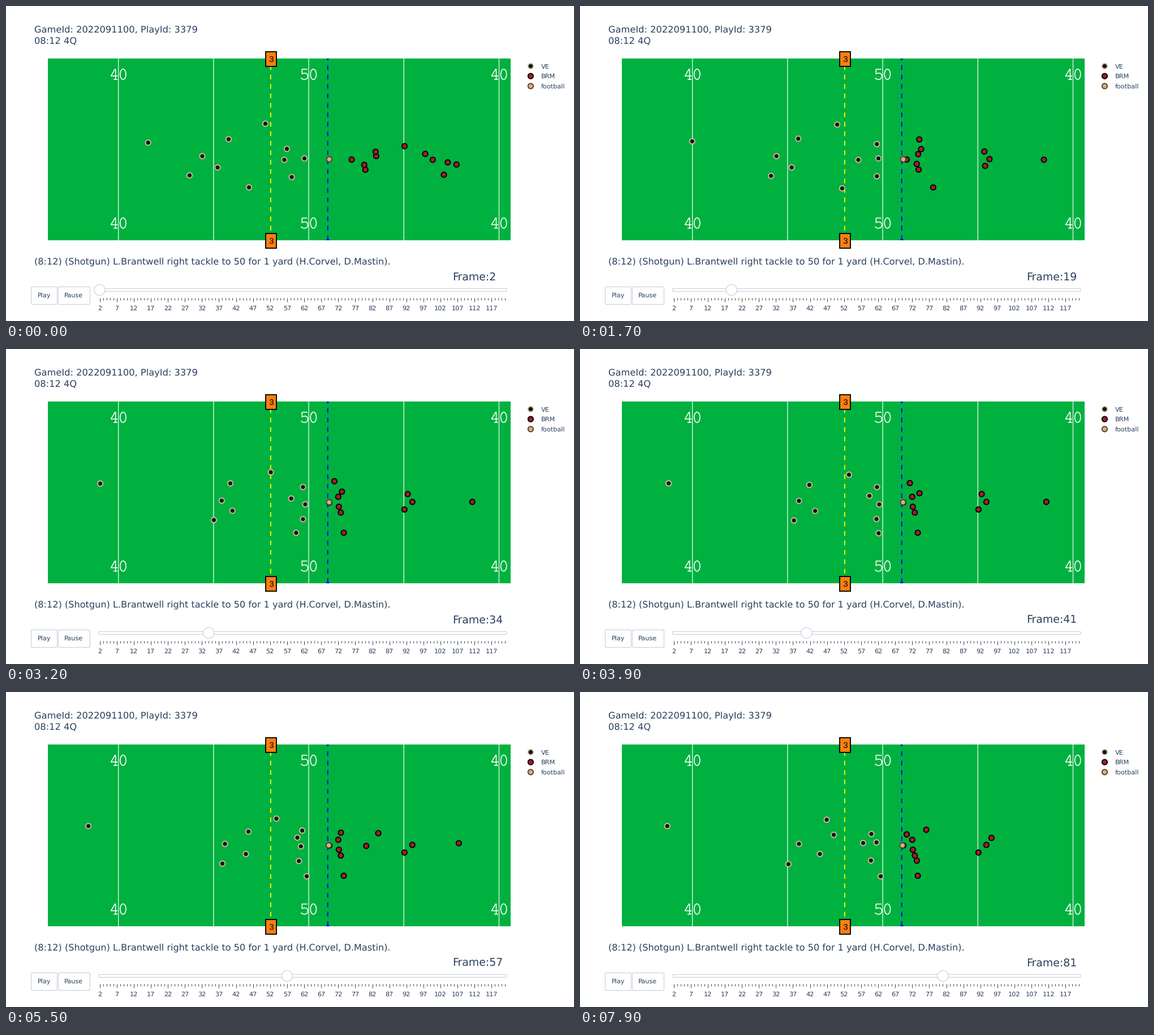
These frames come from a looping animation (1004x558 px, 8 s). A matplotlib script:

```python
import numpy as np
import matplotlib.pyplot as plt
from matplotlib.animation import FuncAnimation
from matplotlib.patches import Circle, FancyBboxPatch, PathPatch, Rectangle
from matplotlib.path import Path

W, H, DPI = 1004, 558, 64
PX = 72 / DPI                      # points per pixel
FRAMES, INTERVAL = 80, 100
UNIT = 0.93                        # stage pixels per layout pixel

INK = "#2a3f5f"
RIM = "#bec8d9"
GREEN = "#00b140"
ORANGE = "#ff7f0e"
BLUE = "#0000ff"
HOME = ("#101820", "#d3bc8d")
AWAY = ("#a71930", "#000000")
BALL = ("#cbb67c", "#663831")

plt.rcParams["font.family"] = "DejaVu Sans"
plt.rcParams["text.hinting"] = "none"

fig = plt.figure(figsize=(W / DPI, H / DPI), dpi=DPI, facecolor="white")
ax = fig.add_axes([0, 0, 1, 1])
ax.set_xlim(0, W)
ax.set_ylim(H, 0)
ax.axis("off")


def label(x, y, text, size, color=INK, ha="left", **kw):
    return ax.text(x, y, text, fontsize=size * PX, color=color, ha=ha,
                   va="baseline", zorder=6, **kw)


def line(xs, ys, color, width, **kw):
    ax.plot(xs, ys, color=color, lw=width * PX, **kw)


def box(x0, y0, x1, y1, face, edge="none", width=0.0, z=1):
    return ax.add_patch(Rectangle((x0, y0), x1 - x0, y1 - y0, fc=face, ec=edge,
                                  lw=width * PX, zorder=z))


def rounded(x0, y0, x1, y1, radius):
    ax.add_patch(FancyBboxPatch(
        (x0, y0), x1 - x0, y1 - y0, fc="white", ec=RIM, lw=UNIT * PX,
        boxstyle=f"round,pad=0,rounding_size={radius}", zorder=2))


def disc(x, y, r, face, edge="none", width=0.0, z=8):
    return ax.add_patch(Circle((x, y), r, fc=face, ec=edge, lw=width * PX,
                               zorder=z))


def dot(x, y, colors, z=8):
    return disc(x, y, 5 * UNIT, *colors, 2 * UNIT, z)


# ---- field ----
TOP, BOTTOM = 93, 414.6
MIDFIELD, YARD = 535.1, 33.64
field = box(74, TOP, 892, BOTTOM, GREEN)

M, L, C = Path.MOVETO, Path.LINETO, Path.CURVE4
FOUR = ([(9, 18.3), (9, 0.3), (8, 0.3), (0.9, 12.3), (12.1, 12.3),
         (5.9, 18.3), (12, 18.3)], [M, L, L, L, L, M, L])
FIVE = ([(11.2, 0.4), (2.2, 0.4), (2.2, 8.6), (5, 6.7), (12.4, 5.8),
         (12.4, 12.5), (12.4, 19.6), (4.3, 19.8), (0.7, 16)],
        [M, L, L, C, C, C, C, C, C])


def stroke(x, y, points, codes):
    ax.add_patch(PathPatch(Path(np.array(points) + (x, y), codes), fc="none",
                           ec="white", lw=1.6 * PX, capstyle="round",
                           joinstyle="round", zorder=3))


def yard_number(x, y, first):
    stroke(x - 14, y - 9.3, *first)
    zero = Path.circle()
    stroke(x + 8.2, y, zero.vertices * (5.1, 9.2), zero.codes)


for n in range(-2, 3):
    x = MIDFIELD + 5 * YARD * n
    line([x, x], [TOP, BOTTOM], "white", 1.4, alpha=0.85, zorder=2, snap=False)
    if n % 2 == 0:
        for y in (121, 384.5):
            yard_number(x, y, FOUR if n else FIVE)

# dashes run upwards from the bottom edge
for yards, color in ((-2, "#ffff00"), (1, BLUE)):
    x = MIDFIELD + yards * YARD
    line([x, x], [BOTTOM, TOP], color, 2 * UNIT, zorder=4, snap=False,
         ls=(0, (4.5, 4.5)), dash_capstyle="butt")
    for y in (BOTTOM, TOP - 1.2):
        disc(x, y, 3 * UNIT, color, z=4).set_clip_path(field)

for y in (94.3, 416.3):
    box(459.2, y - 13, 477.6, y + 13, ORANGE, "black", 2 * UNIT, z=5)
    label(468.4, y + 4.8, "3", 16 * UNIT, "black", "center",
          family="Liberation Mono")

# ---- texts and legend ----
label(50, 46.6, "GameId: 2022091100, PlayId: 3379", 16.2)
label(50, 67, "08:12 4Q", 16.2)
label(50, 457.7, "(8:12) (Shotgun) L.Brantwell right tackle to 50 for 1 yard "
      "(H.Corvel, D.Mastin).", 16.15)
for n, (colors, name) in enumerate(((HOME, "VE"), (AWAY, "BRM"),
                                    (BALL, "football"))):
    y = 106.5 + 17.7 * n
    dot(927.4, y, colors)
    label(946, y + 4.2, name, 11.3)

# ---- controls ----
rounded(44.5, 497.5, 90.5, 528.5, 2)
rounded(92.5, 497.5, 148.5, 528.5, 2)
label(67.2, 516.2, "Play", 11.3, ha="center")
label(119.7, 516.2, "Pause", 11.3, ha="center")
rounded(163.5, 500.6, 885, 505.4, 1.5)


def rail(n):
    return 165.5 + 6.025 * (n - 2)


for n in range(2, 122):
    major = n % 5 == 2
    line([rail(n)] * 2, [517, 523.5 if major else 520.7], "#333333", UNIT,
         solid_capstyle="butt", zorder=2)
    if major and n <= 117:
        label(rail(n), 538.7, str(n), 11.3, ha="center")

grip = disc(rail(2), 503, 9.6, "white", RIM, UNIT, 5)
counter = label(789, 486.2, "", 18.9)


# ---- motion: each player adds up a few eased moves ----
def settle(end, dx, dy):
    """Already walking at the start, slowing to a stop at `end` seconds."""
    def move(t):
        s = min(t / end, 1)
        return (1 - (1 - s) ** 2) * np.array([dx, dy])
    return move


def shift(start, end, dx, dy):
    """Smooth start and stop between two times."""
    def move(t):
        s = min(max((t - start) / (end - start), 0), 1)
        return s * s * (3 - 2 * s) * np.array([dx, dy])
    return move


players = []


def add(colors, z, x, y, *moves):
    players.append((dot(x, y, colors, z), np.array([x, y]), moves))


def defend(x, y, *moves):
    add(HOME, 8, x, y, *moves)


def attack(x, y, dx, dy, *moves):
    add(AWAY, 9, x, y, settle(2.8, dx, dy), *moves)


# deep and second level
defend(251.3, 242, settle(5.8, -106, -4.5), shift(5.9, 6.9, 9, 0))
defend(347, 266, shift(1.6, 3.7, 40, 3))
defend(324.5, 300, shift(0.4, 4.6, 58, 4), shift(6.2, 8.2, -15, 1))
defend(374, 286, shift(1.6, 4.7, 50, 1))
defend(393.5, 236, settle(1.9, -8, -1), shift(1.5, 7.9, 63, 18))
defend(429.5, 321.3, shift(0, 4.4, 102, 5.2))
defend(458.5, 208.5, settle(2, -4, 1.5), shift(1.6, 4.5, 23.5, 14.3),
       shift(5.6, 8.2, -43.5, 2))
# front
defend(496.5, 253, settle(1.9, 28.5, -8.5), shift(4.8, 7.8, -10, 7))
defend(492, 272.5, shift(1.7, 4.6, 23, -14.5), shift(6.2, 8.3, -16, 10.5))
defend(505, 303, settle(1.9, 20, -1.5), shift(3.2, 6.9, -10.7, -3))
defend(527.5, 270, shift(1.7, 3.4, 1.5, 5.3), shift(4, 6.9, -14.7, -3.5),
       shift(6.9, 8, 10, -5.5))

# line, then backs and receivers
attack(611, 272, -39.5, 0)
attack(633.3, 281.4, -45, -2)
attack(635.3, 290, -43.5, -0.3)
attack(654.3, 265.8, -67, -4)
attack(774, 299, -177, 26.5)
attack(754.3, 272.4, -36, -1.5)
attack(780.8, 277, -76.5, 7.3)
attack(653.3, 258.2, -59.5, -5.5, shift(3.4, 5.5, 43, 20),
       shift(5.6, 8.2, -43, 27))
attack(704.5, 248.2, -124, -14, shift(3.2, 5.5, 11.5, 15),
       shift(5.6, 8, -14.5, 3))
attack(741, 262, -31, -5, shift(4.2, 6.7, -98, -13))
attack(796.3, 280.8, 28, -10, shift(4.4, 7.8, -97, -12.3))

add(BALL, 10, 571.3, 271.5, shift(2, 8, -1.3, 0.2))


def draw(i):
    t = i * INTERVAL / 1000
    for mark, home, moves in players:
        mark.center = tuple(home + sum(move(t) for move in moves))
    grip.center = (rail(i + 2), 503)
    counter.set_text(f"Frame:{i + 2}")
    return [mark for mark, _, _ in players] + [grip, counter]


anim = FuncAnimation(fig, draw, frames=FRAMES, interval=INTERVAL,
                     init_func=lambda: draw(0), repeat=True, repeat_delay=0)
plt.show()
```
